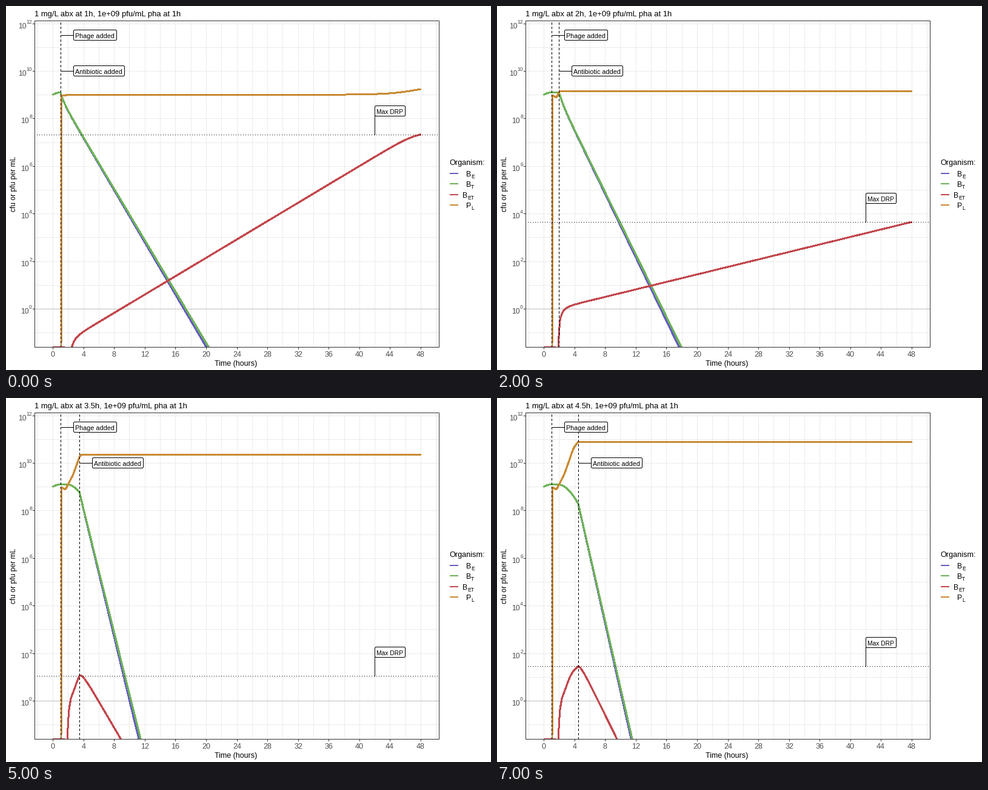
Recreate the animation shown at these times as a matplotlib script. Size 800 by 600 pixels, loop 8000 ms.

```python
import numpy as np
import matplotlib.pyplot as plt
from matplotlib.animation import FuncAnimation
from matplotlib.patches import FancyBboxPatch, Rectangle

PT = 0.72  # points per pixel at 100 dpi
plt.rcParams["font.family"] = "Liberation Sans"
plt.rcParams["path.simplify"] = False

LEFT, RIGHT, TOP, BOTTOM = 47, 714, 24, 562
COLORS = {"E": "#685cc4", "T": "#6db356", "ET": "#c2484d", "L": "#c88a33"}
HOURS = np.arange(1, 5, 0.5)
TIME = np.r_[0:3:0.125, 3:6:0.25, 6:49]

# How the hour of the antibiotic sets the rates (powers of ten per hour).
KEY_HOUR = [1, 1.5, 2, 3, 4, 4.5]
KILL = [0.54, 0.538, 0.655, 1.19, 1.404, 1.404]
DIP = [0.26, 0.27, 0.25, 0.07, 0, 0]
ET_START = [-1.53, -1.035, 0.023, 1.08, 1.62, 1.70]
ET_RATE = [0.193, 0.195, 0.0788, -0.445, -0.654, -0.654]
ET_CAP, TAU, BURST = 7.43, 0.55, 11


def x_at(hour):
    return 77 + 12.646 * hour


def y_at(power):
    return 499 - 39.2 * power


# Untreated courses, as powers of ten
def free_b(t):
    return (9.09 - 0.09 * np.clip(1 - t, 0, 1) ** 2
            - 0.16 * np.maximum(t - 2, 0) ** 1.75)


def free_et(t):
    return np.interp(t, [1.88, 2.05, 2.35, 2.8, 3.4, 3.9, 4.5],
                     [-2, -0.55, 0.08, 0.47, 1.0, 1.27, 1.45], left=-9)


def free_p(t):
    return np.interp(t, [1, 1.65, 2, 2.6, 3, 3.9, 4.5],
                     [9, 8.88, 9.09, 9.46, 9.8, 10.63, 10.89])


# Courses with the antibiotic given at hour a
def single(a):
    s = np.maximum(TIME - a, 0)
    drop = (np.interp(a, KEY_HOUR, KILL) * s
            + np.interp(a, KEY_HOUR, DIP) * (1 - np.exp(-s / 0.6)))
    return free_b(np.minimum(TIME, a)) - drop


def double(a):
    start = np.interp(a, KEY_HOUR, ET_START)
    trend = start + np.interp(a, KEY_HOUR, ET_RATE) * (TIME - a)
    trend = -0.5 * np.log10(10 ** (-2 * trend) + 10 ** (-2 * ET_CAP))
    onset = a + TAU * np.log(1 - 10 ** (free_et(a) - start))
    onset = max(onset, 2.6 - 0.4 * a)
    rise = np.maximum(1 - np.exp((onset - TIME) / TAU), 1e-9)
    v = np.where(TIME < a, free_et(TIME), trend + np.log10(rise))
    return np.maximum(v, -2)


def phage(a, et):
    level = max(9, free_p(a + 0.1))
    w = np.exp(-(TIME - a) / 0.6)
    after = level + w * (np.minimum(free_p(TIME), level) - level)
    v = np.where(TIME < a, free_p(TIME), after)
    n = 10 ** et
    lysed = np.r_[0, np.cumsum((n[1:] + n[:-1]) / 2 * np.diff(TIME))]
    return np.log10(10 ** v + BURST * lysed)


# Whole coordinates are pixel edges, so thin lines snap to that pixel.
fig = plt.figure(figsize=(8, 6), dpi=100, facecolor="white")
ax = fig.add_axes([0, 0, 1, 1])
ax.set_xlim(0, 800)
ax.set_ylim(600, 0)
ax.axis("off")
panel = Rectangle((LEFT, TOP), RIGHT - LEFT, BOTTOM - TOP, fill=False,
                  ec="#333333", lw=PT, zorder=9)
ax.add_patch(panel)


def line(xs, ys, color="black", width=1, z=2, clip=True, **kw):
    art, = ax.plot(xs, ys, color=color, lw=width * PT, zorder=z,
                   antialiased=False, solid_capstyle="butt",
                   solid_joinstyle="bevel", dash_capstyle="butt", **kw)
    if clip:
        art.set_clip_path(panel)
    return art


def text(x, y, s, size, color="black", ha="left", z=12, **kw):
    kw.setdefault("va", "baseline")
    return ax.text(x, y, s, fontsize=size * PT, color=color, ha=ha,
                   zorder=z, **kw)


class Tag:
    """Boxed label joined to its line by a short leader."""

    def __init__(self, words, width, size):
        self.leader = line([], [], z=6)
        self.box = FancyBboxPatch((0, 0), width, 17, fc="white", ec="black",
                                  boxstyle="round,pad=0,rounding_size=2",
                                  lw=PT, zorder=7)
        ax.add_patch(self.box)
        self.words = text(0, 0, words, size, z=8)

    def place(self, x, y, start, end):
        self.box.set_x(x + 0.5)
        self.box.set_y(y - 0.5)
        self.words.set_position((x + 3, y + 13))
        self.leader.set_data(*zip(start, end))


# Grid, axes and axis labels
for hour in range(-2, 51, 2):
    x = round(x_at(hour))
    line([x, x], [TOP, BOTTOM], "#ebebeb", z=0)
for power in range(-1, 13):
    y = round(y_at(power))
    line([LEFT, RIGHT], [y, y], "#ebebeb", z=0)
line([LEFT, RIGHT], [499, 499], "#bebebe", z=1)

for hour in range(0, 49, 4):
    x = round(x_at(hour))
    line([x, x], [BOTTOM, BOTTOM + 3], "#333333", clip=False)
    text(x, 578, str(hour), 12.5, "#4d4d4d", "center")
for power in range(0, 13, 2):
    y = round(y_at(power))
    line([LEFT - 3, LEFT], [y, y], "#333333", clip=False)
    text(43, y, str(power), 8.7, "#4d4d4d", "right")
    text(43 - 4.8 * len(str(power)), y + 8, "10", 12.2, "#4d4d4d", "right")

text(379.5, 593, "Time (hours)", 12.5, ha="center")
text(13, 293, "cfu or pfu per mL", 12, ha="center", va="center", rotation=90)

# Legend
text(731, 262, "Organism:", 12.6)
for i, (sub, color) in enumerate(COLORS.items()):
    y = 276 + 17.4 * i
    x = 772.5 - 5.5 * len(sub)
    line([732, 746], [round(y)] * 2, color, 2, clip=False)
    text(x, y + 8, sub, 8.7)
    text(x, y + 5, "P" if sub == "L" else "B", 12.3, ha="right")

# Moving parts
title = text(47, 17, "", 13)
line([77, 97], [BOTTOM, BOTTOM], COLORS["ET"], 2, z=3)
curves = {k: line([], [], c, 2, z=3) for k, c in COLORS.items()}
dashed, dotted = (0, (4, 4)), (0, (1, 3))
line([90, 90], [BOTTOM, TOP], z=5, ls=dashed)
abx_line = line([], [], z=5, ls=dashed)
max_line = line([], [], z=5, ls=dotted)
phage_tag = Tag("Phage added", 71, 10.7)
abx_tag = Tag("Antibiotic added", 84, 10.7)
max_tag = Tag("Max DRP", 50, 10.3)
phage_tag.place(111, 40, (90, 48), (111, 48))


def draw(i):
    a = HOURS[i]
    title.set_text(f"1 mg/L abx at {a:g}h, 1e+09 pfu/mL pha at 1h")

    x = x_at(TIME)
    y = y_at(single(a))
    gap = min(3.8, 7.5 - 1.25 * a)
    curves["T"].set_data(x, y)
    curves["E"].set_data(x - gap * np.clip((y - 150) / 412, 0, 1), y)

    et = double(a)
    curves["ET"].set_data(x, y_at(et))
    added = TIME > 1
    curves["L"].set_data(np.r_[91, x[added]],
                         np.r_[BOTTOM, y_at(phage(a, et))[added]])

    xa, peak = round(x_at(a)), round(y_at(et.max()))
    abx_line.set_data([xa, xa], [BOTTOM, TOP])
    abx_tag.place(xa + 21, 99, (xa, 107), (xa + 21, 107))
    max_line.set_data([LEFT, RIGHT], [peak, peak])
    max_tag.place(608, peak - 47, (608, peak), (608, peak - 34))


anim = FuncAnimation(fig, draw, frames=len(HOURS), interval=1000,
                     repeat=True, repeat_delay=0)
plt.show()
```
